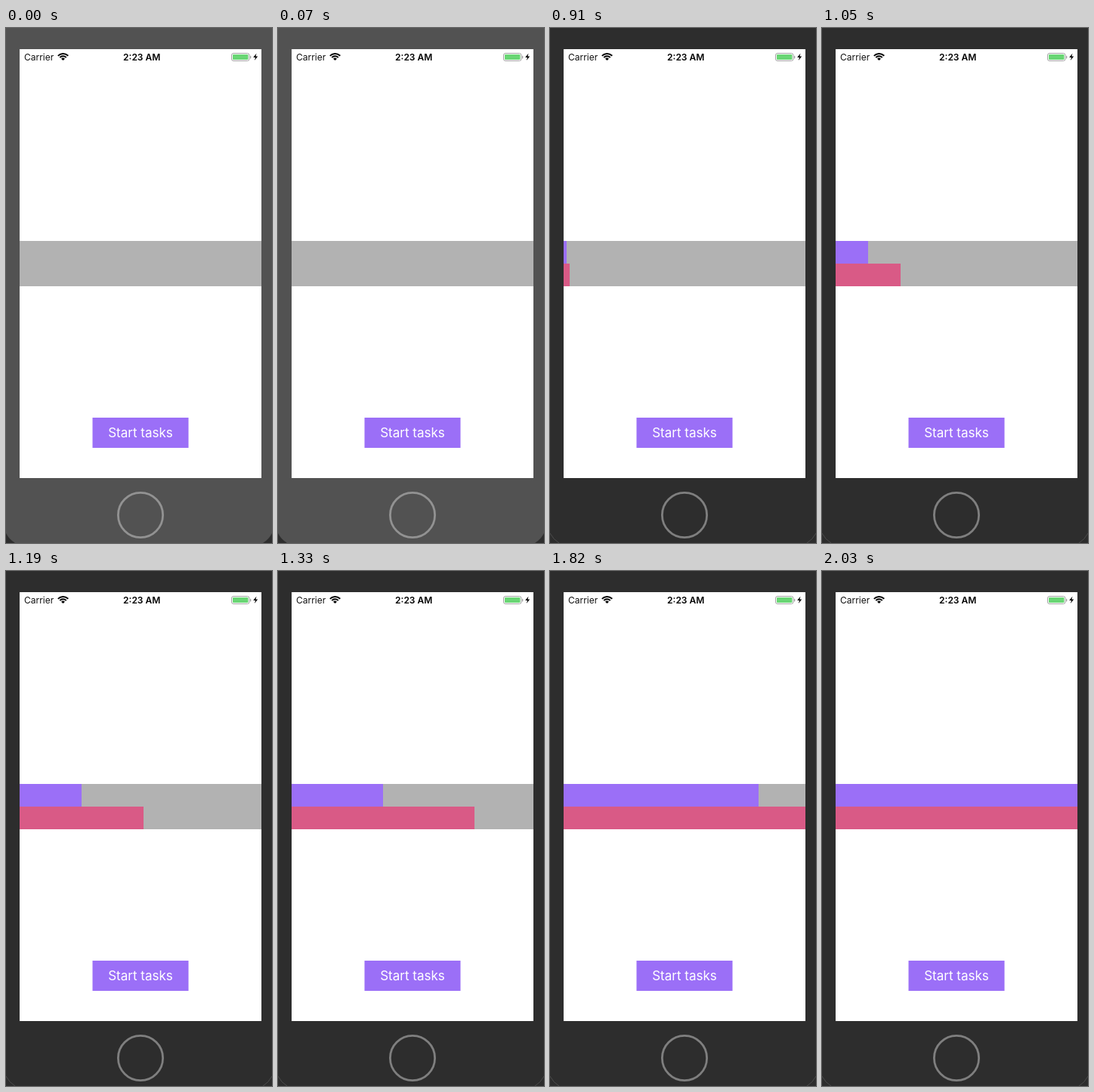
Write an HTML page with a canvas that moves like this. It is 352 by 682 pixels and loops after 2660 ms.

```html
<!DOCTYPE html>
<html lang="en">
<head>
<meta charset="utf-8">
<title>Task progress</title>
<style>
  html, body { margin: 0; width: 100%; height: 100%; overflow: hidden; background: #2d2d2d; }
  canvas { display: block; width: 352px; height: 682px; }
</style>
</head>
<body>
<canvas id="stage"></canvas>
<script>
const W = 352, H = 682, LOOP = 2660, STEP = 70;
const WAKE = 770, START = 896, DONE = 2030;
const SCREEN = { x: 18, y: 28, w: 320, h: 568 };
const PURPLE = '#9b6ff7', PINK = '#d95a86', GREY = '#b2b2b2';

const canvas = document.getElementById('stage');
const ctx = canvas.getContext('2d');
const scale = window.devicePixelRatio || 1;
canvas.width = W * scale;
canvas.height = H * scale;
ctx.scale(scale, scale);

function rect(color, x, y, w, h) {
  ctx.fillStyle = color;
  ctx.fillRect(x, y, w, h);
}

function label(text, x, y, font, color, align = 'left') {
  ctx.font = font + ' Inter, sans-serif';
  ctx.fillStyle = color;
  ctx.textAlign = align;
  ctx.fillText(text, x, y);
}

function polygon(points) {
  ctx.beginPath();
  points.forEach(([x, y]) => ctx.lineTo(x, y));
  ctx.closePath();
  ctx.fill();
}

function drawBody(awake) {
  rect(awake ? '#2d2d2d' : '#525252', 0, 0, W, H);

  // Rounded lower corners of the handset
  for (const side of [0, 1]) {
    ctx.save();
    if (side) {
      ctx.translate(W, 0);
      ctx.scale(-1, 1);
    }
    ctx.beginPath();
    ctx.moveTo(0, 669);
    ctx.quadraticCurveTo(4, 677, 12, 682);
    if (awake) {
      ctx.strokeStyle = '#4b4b4b';
      ctx.lineWidth = 1;
      ctx.stroke();
    } else {
      ctx.lineTo(0, 682);
      ctx.fillStyle = '#2d2d2d';
      ctx.fill();
    }
    ctx.restore();
  }

  ctx.beginPath();
  ctx.arc(178, 645, 29.6, 0, 2 * Math.PI);
  ctx.strokeStyle = awake ? '#7f7f7f' : '#929292';
  ctx.lineWidth = 2.8;
  ctx.stroke();
}

function drawWifi(x, y) {
  const from = -Math.PI * 0.765, to = -Math.PI * 0.235;
  ctx.strokeStyle = ctx.fillStyle = '#000';
  ctx.lineWidth = 2;
  for (const r of [9, 5.7]) {
    ctx.beginPath();
    ctx.arc(x, y, r, from, to);
    ctx.stroke();
  }
  ctx.beginPath();
  ctx.moveTo(x, y);
  ctx.arc(x, y, 3.3, from, to);
  ctx.fill();
}

function drawBattery() {
  ctx.beginPath();
  ctx.roundRect(298.5, 33.5, 23.5, 10, 2.5);
  ctx.strokeStyle = '#a3a3a3';
  ctx.lineWidth = 1;
  ctx.stroke();

  ctx.beginPath();
  ctx.roundRect(300, 35, 20.5, 7, 1);
  ctx.fillStyle = '#69d674';
  ctx.fill();

  ctx.beginPath();
  ctx.roundRect(323, 36.8, 1.3, 3.6, 0.6);
  ctx.fillStyle = '#a3a3a3';
  ctx.fill();

  ctx.fillStyle = '#000';
  polygon([[331.5, 33.5], [327.2, 39], [330, 39], [328.8, 43], [333.2, 37.4], [330.4, 37.4]]);
}

function drawScreen() {
  rect('#fff', SCREEN.x, SCREEN.y, SCREEN.w, SCREEN.h);
  label('Carrier', 24, 42.5, '400 12px', '#111');
  label('2:23 AM', 179.7, 42.5, '600 12px', '#000', 'center');
  drawWifi(75.5, 43);
  drawBattery();
  rect(PURPLE, 114.5, 516, 127, 40);
  label('Start tasks', 178, 542, '400 17px', '#fff', 'center');
}

function drawBars(t) {
  const elapsed = Math.max(0, t - START);
  const bar = (color, y, speed) => {
    const w = t >= DONE ? SCREEN.w : Math.min(SCREEN.w, Math.round(elapsed * speed));
    rect(color, SCREEN.x, y, w, 30);
  };
  rect(GREY, SCREEN.x, 282, SCREEN.w, 60);
  bar(PURPLE, 282, 0.2795);
  bar(PINK, 312, 0.5575);
}

function draw(now) {
  const t = Math.floor((now % LOOP) / STEP) * STEP;
  drawBody(t >= WAKE);
  drawScreen();
  drawBars(t);
}

let origin = null;
function tick(now) {
  origin ??= now;
  draw(now - origin);
  requestAnimationFrame(tick);
}
draw(0);
requestAnimationFrame(tick);
</script>
</body>
</html>
```
